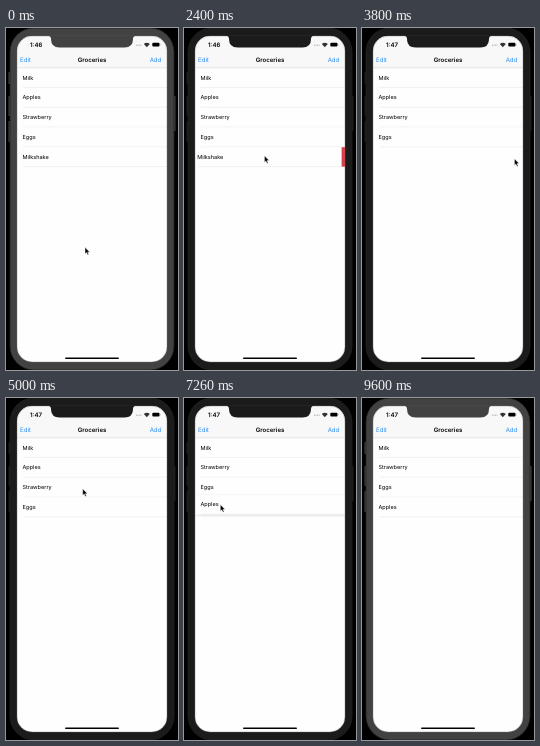
Animation of 172 by 342 pixels, one loop 9660 ms. Source, as an HTML page:

```html
<!DOCTYPE html>
<html lang="en">
<head>
<meta charset="utf-8">
<title>Groceries</title>
<style>
html, body { margin: 0; width: 100%; height: 100%; overflow: hidden; background: #000; }
svg { display: block; width: 100vw; height: 100vh; }
text { font: 5.55px Inter, "Liberation Sans", sans-serif; text-rendering: geometricPrecision; }
.bar { font-size: 6.1px; }
.bold { font-weight: 600; }
.link { fill: #2a91f5; }
.line { stroke: #e8e8ea; stroke-width: .6; }
</style>
</head>
<body>
<svg viewBox="0 0 172 342">
  <defs>
    <clipPath id="clip"><rect x="11" y="8" width="150" height="326" rx="15"/></clipPath>
    <filter id="shadow" x="-10%" y="-40%" width="120%" height="180%">
      <feDropShadow dx="0" dy=".6" stdDeviation="1.2" flood-opacity=".18"/>
    </filter>
  </defs>
  <g id="phone">
    <path d="M2.5 44h3v12h-3zM2.5 68h3v20h-3zM2.5 93h3v21h-3zM166.5 68h3v35h-3z"/>
    <rect x="4" width="164" height="342" rx="24" stroke="#222" stroke-width=".8"/>
    <g clip-path="url(#clip)">
      <rect x="11" y="8" width="150" height="326" fill="#fefefe"/>
      <g id="list"></g>
      <rect x="11" y="8" width="150" height="32" fill="#f8f8f8"/>
      <path d="M11 39.8h150" stroke="#d0d0d2" stroke-width=".5"/>
      <g fill="#000">
        <text id="clock" class="bar bold" x="24" y="18.8"></text>
        <text class="bar bold" x="86" y="33.9" text-anchor="middle">Groceries</text>
        <path d="M137.8 16q3-2.4 6 0l-3 3.2z" fill="#333"/>
        <rect x="146.3" y="14.8" width="7.2" height="3.8" rx="1"/>
        <rect x="59" y="329.4" width="54" height="1.7" rx=".8"/>
      </g>
      <path d="M130 17.2h5.6" stroke="#aaa" stroke-dasharray="1 .53"/>
      <path d="M154 16v1.5" stroke="#777" stroke-width=".6"/>
      <text class="bar link" x="14" y="33.9">Edit</text>
      <text class="bar link" x="155.3" y="33.9" text-anchor="end">Add</text>
    </g>
    <rect x="11" y="8" width="150" height="326" rx="15" fill="none" stroke="#777" stroke-width=".4"/>
    <path d="M42 7.5q3 .5 3 3.5q0 8.5 8.5 8.5h65q8.5 0 8.5-8.5q0-3 3-3.5z"/>
  </g>
  <path id="cursor" d="M0 0v6.7l1.5-1.4 1.1 2.5 1.2-.5-1.1-2.4h2.1z" stroke="#fff" stroke-width=".5"/>
</svg>
<script>
const LOOP = 9660, ROW = 19.8, TOP = 40, DELETE_WIDTH = 30;
const $ = id => document.getElementById(id);
const names = ["Milk", "Apples", "Strawberry", "Eggs", "Milkshake"];
const [, apples, , , milkshake] = names;

// Eased progress from 0 to 1 while v runs from a to b
function ease(v, a, b) {
  const p = Math.min(1, Math.max(0, (v - a) / (b - a)));
  return p * p * (3 - 2 * p);
}

// The pointer rests between these moves
const moves = [
  { from: 0, until: 500, to: [103, 30] },
  { from: 500, until: 1000, to: [122.4, 127.7] },
  { from: 1930, until: 2860, to: [40, 127.7] },
  { from: 2930, until: 3530, to: [152.4, 130.7] },
  { from: 4000, until: 5660, to: [36.3, 69.5] },
  { from: 6500, until: 7400, to: [36.3, 69.5 + 2 * ROW] },
  { from: 7600, until: 8200, to: [66.3, 126] },
  { from: 8660, until: 9060, to: [150, 345] }
];

function pointer(t) {
  return moves.reduce((at, { from, until, to }) =>
    at.map((v, k) => v + (to[k] - v) * ease(t, from, until)), [79, 219.3]);
}

const list = $("list");
list.innerHTML = names.map(name => `<g>
  <rect x="11" y=".3" width="150" height="19.2" fill="#fefefe"/>
  <path class="line" d="M17 19.4h144"/>
  <text x="16.5" y="11.6" fill="#000">${name}</text>
</g>`).join("");
const rows = [...list.children];
const dragged = rows[names.indexOf(apples)];
const removed = rows[names.indexOf(milkshake)];
removed.innerHTML += `<rect x="161" width="${DELETE_WIDTH}" height="19.5" fill="#dd3c48"/>
  <text x="${161 + DELETE_WIDTH / 2}" y="11.6" fill="#fff" text-anchor="middle">Delete</text>`;
list.append(dragged); // stays on top

function draw(t) {
  const inactive = t < 2260 || t >= 9530;
  $("phone").setAttribute("fill", inactive ? "#424242" : "#1b1b1b");
  $("clock").textContent = t < 3200 ? "1:46" : "1:47";

  const swipe = DELETE_WIDTH * ease(t, 2280, 2860);
  const dragPlace = 1 + 2 * ease(t, 6500, 7400);
  rows.forEach((row, i) => {
    // Rows below the dragged one step up as it passes them
    const passed = i > 1 ? ease(dragPlace, i - .8, i - .2) : 0;
    const place = row === dragged ? dragPlace : i - passed;
    const x = row === removed ? -swipe : 0;
    row.setAttribute("transform", `translate(${x} ${TOP + ROW * place})`);
  });
  removed.style.display = t < 3800 ? "" : "none";
  dragged.style.filter = t > 6500 && t < 7600 ? "url(#shadow)" : "";

  $("cursor").setAttribute("transform", `translate(${pointer(t)})`);
}

const start = performance.now();
function tick(now) {
  draw(Math.max(0, now - start) % LOOP);
  requestAnimationFrame(tick);
}
tick(start);
</script>
</body>
</html>
```
